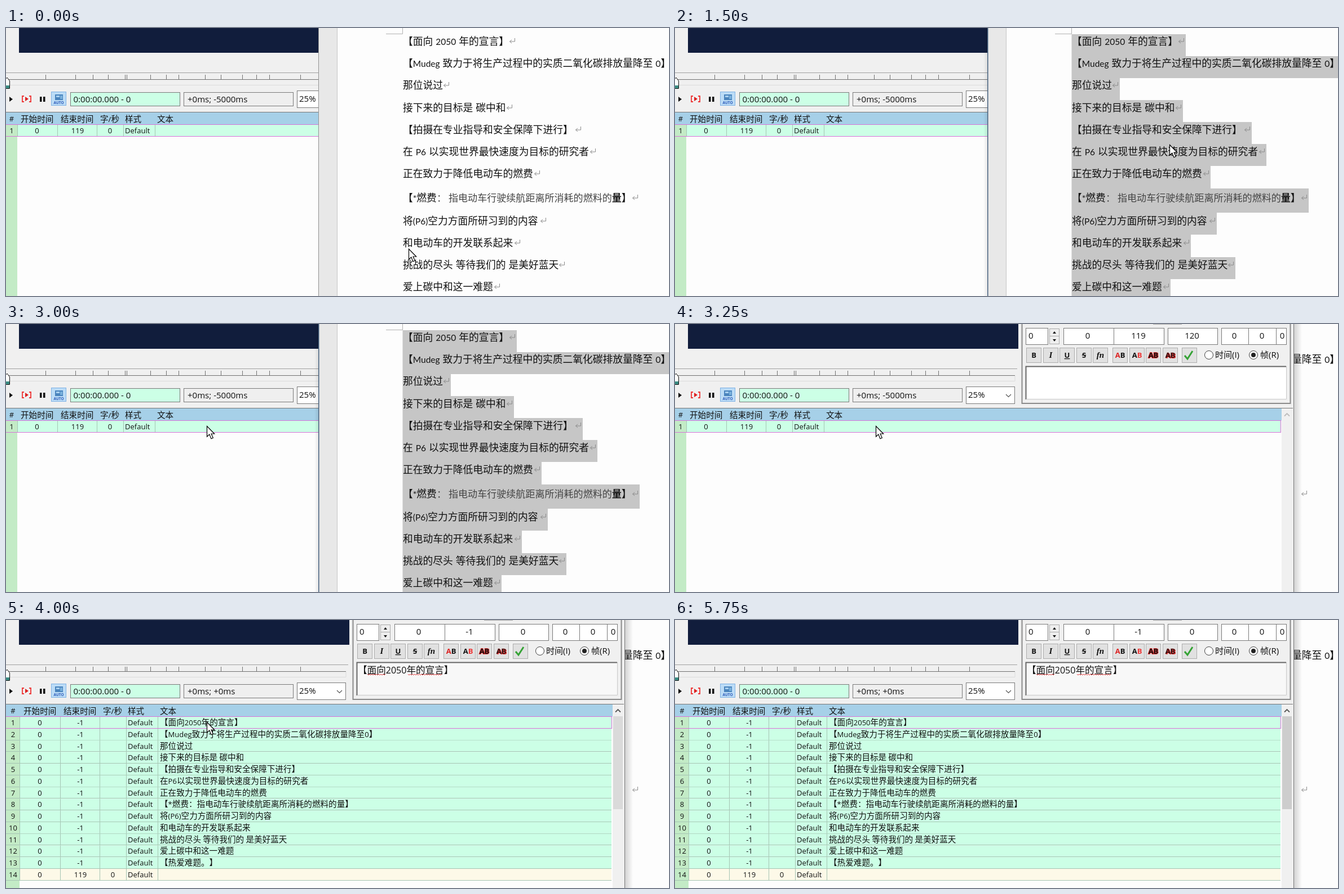
Recreate the animation shown at these times as an HTML page. Size 1176x476 px, loop 6000 ms.

```html
<!DOCTYPE html>
<html lang="zh-CN">
<head>
<meta charset="utf-8">
<title>粘贴字幕</title>
<style>
html, body { margin: 0; width: 100%; height: 100%; overflow: hidden; background: #fff; }
#stage { display: block; width: 1176px; height: 476px; }
text { font: 15px 'Open Sans', 'Noto Sans CJK SC', 'Noto Sans CJK', sans-serif; fill: #111; text-spacing-trim: space-all; }
.doc { font: 17.75px 'Noto Sans CJK SC', 'Noto Sans CJK', sans-serif; word-spacing: 1px; }
.doc tspan { font: 15.5px Lato, sans-serif; }
.doc .note { font: 17.06px 'Noto Sans CJK SC', 'Noto Sans CJK', sans-serif; fill: #444; }
.doc .strong { font: bold 17px 'Noto Sans CJK SC', 'Noto Sans CJK', sans-serif; }
.tab { font: 14.6px 'Noto Sans CJK SC', 'Noto Sans CJK', sans-serif; }
.tab tspan, .num { font: 13px 'Open Sans', sans-serif; }
.edit { font: 16.6px 'Noto Sans CJK SC', 'Noto Sans CJK', sans-serif; }
.edit tspan { font: 16px 'Open Sans', sans-serif; }
.mid { text-anchor: middle; }
.ab { font: bold 13px 'Open Sans', sans-serif; }
.serif { font: italic bold 15px 'Liberation Serif', serif; }
</style>
</head>
<body>
<svg id="stage" viewBox="0 0 1176 476"></svg>
<script>
const rect = (x, y, w, h, fill, stroke = 'none') =>
  `<rect x="${x}" y="${y}" width="${w}" height="${h}" fill="${fill}" stroke="${stroke}"/>`;
const path = (d, stroke, fill = 'none', width = 1) =>
  `<path d="${d}" stroke="${stroke}" fill="${fill}" stroke-width="${width}"/>`;
const text = (x, y, s, cls = '', more = '') => `<text x="${x}" y="${y}" class="${cls}" ${more}>${s}</text>`;
const mixed = s => s.replace(/[!-~]+/g, '<tspan>$&</tspan>');
const group = (id, s) => `<g id="${id}">${s}</g>`;

// text, vertical centre, top of the selection, x of the paragraph mark
const lines = [
  ['【面向 2050 年的宣言】', 23, 11, 892],
  ['【Mudeg 致力于将生产过程中的实质二氧化碳排放量降至 0】', 62, 50, 1180],
  ['那位说过', 101, 89, 775],
  ['接下来的目标是 碳中和', 141, 128, 887],
  ['【拍摄在专业指导和安全保障下进行】', 180, 167, 1009],
  ['在 P6 以实现世界最快速度为目标的研究者', 219, 206, 1035],
  ['正在致力于降低电动车的燃费', 258, 245, 936],
  ['【*燃费：指电动车行驶续航距离所消耗的燃料的量】', 301, 285, 1110],
  ['将(P6)空力方面所研习到的内容', 342, 328, 947],
  ['和电动车的开发联系起来', 381, 367, 901],
  ['挑战的尽头 等待我们的 是美好蓝天', 420, 407, 980],
  ['爱上碳中和这一难题', 459, 446, 865]
];

function docLine([s, y]) {
  const base = y + 6.5, [head, note] = s.split('：');
  if (!note) return text(704, base, mixed(s), 'doc');
  return text(704, base, mixed(head) + '<tspan class="note">：</tspan>', 'doc') +
    text(785, base, `<tspan class="note">${note.slice(0, -2)}</tspan>` +
      '<tspan class="strong">量</tspan>】', 'doc');
}

function wordWindow() {
  const bottom = i => i < 11 ? lines[i + 1][2] : 476;
  const marks = lines.map(l => path(`M${l[3] + 10.5} ${l[1] - 5}v6h-9m3.5-3l-3.5 3 3.5 3`, '#8a8a8a')).join('');
  return rect(555, 0, 621, 476, '#fdfdfd') + rect(555, 0, 32, 476, '#e8e8e8') +
    rect(587, 0, 1, 476, '#c6c6c6') +
    path('M674 10.5h29.5V0', '#b0b0b0') +
    group('selection', lines.map((l, i) =>
      rect(703.5, l[2], l[3] + 14 - 703.5, bottom(i) - l[2], '#c6c6c6')).join('')) +
    lines.map(docLine).join('') + marks +
    group('caret', rect(886, 131, 1, 21, '#000'));
}

function table(rows, dx) {
  const pitch = 20.77, top = 172;
  const cols = [91, 161.5, 208, 264].map(x => x + dx);
  let s = rect(0, 150, 1076, 21.5, '#a6d0e8') + rect(0, 171.5, 20 + dx * .8, 305, '#c3ebc6');
  s += text(10 + dx * .5, 166, '#', 'num mid');
  [[26, '开始时间'], [97, '结束时间'], [167, '字/秒'], [211, '样式'], [268, '文本']]
    .forEach(([x, name]) => s += text(x + dx, 167, mixed(name), 'tab'));
  rows.forEach((row, i) => {
    const y = top + i * pitch, base = y + 15, blank = row === '';
    s += rect(20 + dx * .8, y, 1054 - dx * .8, pitch, blank && i ? '#fdf9e8' : '#ccffe6');
    s += path(`M0 ${Math.round(y + pitch) - .5}H1074`, '#a5c4b3');
    cols.concat(20 + dx * .8).forEach(x => s += path(`M${Math.floor(x) + .5} ${y}v${pitch}`, '#a5c4b3'));
    s += text(10 + dx * .5, base, i + 1, 'num mid') + text(55 + dx, base, 0, 'num mid') +
      text(127 + dx, base, blank ? 119 : -1, 'num mid') + text(211 + dx, base, 'Default', 'num');
    s += blank ? text(184.5 + dx, base, 0, 'num mid') : text(268 + dx, base, mixed(row), 'tab');
  });
  return s + rect(-1, 171.5, 1075.5, 21, 'none', '#d873d8');
}

const field = (x, y, w, h, fill = '#fff') => rect(x + .5, y + .5, w - 1, h - 1, fill, '#7a7a7a');

function player() {
  const ticks = [70, 123, 154, 181, 211, 214, 256, 284, 306, 353, 381, 419, 444, 467, 522];
  return rect(23, 0, 586, 44, '#111d3c') +
    path('M0 79.5H607', '#a0a0a0') + path('M0 91.5H603' + ticks.map(x => `M${x + .5} 83v8`).join(''), '#707070') +
    path('M0 101.5H603V92', '#dcdcdc') +
    path('M-4 107.5V94l6-6 4.5 6v13.5z', '#111', '#fff') + rect(0, 102, 6, 5, '#3a8c84') +
    path('M6 122l6 4.5-6 4.5z', 'none', '#111') +
    path('M32 121h-3v10h3M41 121h3v10h-3', '#e33', 'none', 1.8) + path('M34 122l6 4-6 4z', 'none', '#d22') +
    rect(60, 122, 3.5, 9, '#111') + rect(66, 122, 3.5, 9, '#111') +
    rect(80.5, 113.5, 26, 24, '#bcdcf6', '#7fb2e5') + rect(87, 118, 14, 10, '#4a84bd') +
    rect(89, 120, 6, 3, '#a9d0ee') + rect(96, 120, 4, 6, '#79b0dc') +
    text(93.5, 135, 'AUTO', 'mid', 'style="font-size:6.5px;font-weight:bold;fill:#2858b8"') +
    field(114, 114, 195, 25, '#ccffe6') + text(119.5, 132, '0:00:00.000 - 0') +
    field(315, 114, 195, 25, '#efefef') + text(322, 132, '', '', 'id="shift"') +
    field(516, 111, 87, 31) + text(520, 131, '25%') + path('M587 125l4.5 4.5 4.5-4.5', '#555', 'none', 1.2);
}

function editor() {
  const key = x => rect(x + .5, 42.5, 26, 26, '#e1e1e1', '#adadad');
  const label = (x, s, cls, more) => text(x + 13.5, 60, s, cls + ' mid', more);
  const wave = (x, n) => path(`M${x} 96` + 'l2 2 2-2'.repeat(n), '#e04040');
  const radio = x => `<circle cx="${x}" cy="55" r="7.5" fill="#fff" stroke="#444"/>`;
  const glow = 'stroke="#e03030" stroke-width="2" paint-order="stroke"';
  const boxes = [[622, 40], [689, 90], [778, 90], [874, 89], [969, 49], [1017, 50], [1066, 19]];
  const values = [[732, 'start'], [822, 'end'], [917, 'span'], [992], [1041], [1077]];
  return path('M615.5 0V141H1091.5V0', '#8a8a8a', 'none', 2) + rect(848, 0, 51, 1, '#a8a8a8') +
    boxes.map(([x, w]) => field(x, 7, w, 30)).join('') + text(627, 26, 0) +
    values.map(([x, id]) => text(x, 26, 0, 'mid', id ? `id="${id}"` : '')).join('') +
    rect(664.5, 8.5, 17, 13, '#eee', '#aaa') + rect(664.5, 21.5, 17, 14, '#eee', '#aaa') +
    path('M670 17l3-4 3 4zM670 27l3 4 3-4z', 'none', '#111') +
    [623, 653, 682, 712, 741, 776, 806, 835, 865, 899].map(key).join('') +
    label(623, 'B', 'ab') + label(653, 'I', 'serif') +
    label(682, 'U', 'ab', 'text-decoration="underline"') + label(712, 'S', 'ab', 'text-decoration="line-through"') +
    label(741, 'fn', 'serif') +
    label(776, '<tspan fill="#d22">A</tspan>B', 'ab') + label(806, 'A<tspan fill="#e33">B</tspan>', 'ab') +
    label(835, 'AB', 'ab', glow) +
    text(880, 61, 'AB', 'ab mid', 'style="fill:#d22"') + label(865, 'AB', 'ab', 'stroke="#a22" stroke-width=".5"') +
    path('M904 56l5 6 9-14', '#36a336', 'none', 3) +
    radio(947) + text(958, 60, '时间(I)') + radio(1026) +
    '<circle cx="1026" cy="55" r="4" fill="#222"/>' + text(1038, 60, '帧(R)') +
    rect(622, 75, 463, 59, '#fff') + path('M622.5 134V75.5H1084', '#666', 'none', 2) +
    path('M1084.5 75V133.5H623', '#c8c8c8') +
    group('entry', rect(624, 77, 460, 56, '#f8f8f8') + text(624, 95, mixed('【面向2050年的宣言】'), 'edit') +
      wave(641, 8) + wave(713, 15));
}

function subtitleWindow() {
  return rect(0, 0, 1098, 476, '#f0f0f0') + player() + editor() +
    rect(0, 149, 1096, 1, '#777') + rect(0, 171, 1076, 305, '#fdfdfd') +
    group('empty', table([''], 0)) +
    group('filled', table([...lines.map(l => l[0].replace(/ ?([!-~]+) ?/g, '$1')), '【热爱难题。】', ''], 5)) +
    rect(1076, 150, 21, 326, '#f0f0f0') +
    '<rect id="thumb" x="1077" y="171" width="17" height="165"/>' +
    '<path id="up" d="M1081 163.5l4.5-4.5 4.5 4.5" fill="none" stroke-width="1.8"/>' +
    rect(1097, 0, 1, 476, '#777');
}

const stage = document.getElementById('stage');
stage.innerHTML = `<defs>
  <linearGradient id="shade"><stop stop-color="#000" stop-opacity=".17"/><stop offset="1" stop-color="#000" stop-opacity="0"/></linearGradient>
  <linearGradient id="shadeLeft"><stop stop-color="#000" stop-opacity="0"/><stop offset="1" stop-color="#000" stop-opacity=".1"/></linearGradient></defs>` +
  wordWindow() + group('shadow', rect(1098, 0, 14, 476, 'url(#shade)')) +
  `<svg id="app" height="476">${subtitleWindow()}</svg>` +
  group('edge', rect(547, 0, 8, 476, 'url(#shadeLeft)') + rect(554, 0, 1.5, 476, '#46617f')) +
  group('dimEdge', rect(554, 0, 1, 476, '#929292')) +
  group('cursor', path('M.5 .5V19l4.3-4 3.2 7.7 3.3-1.4-3.2-7.3h5.6z', '#000', '#fff', 1.2));

const el = id => document.getElementById(id);
const show = (id, on) => el(id).setAttribute('display', on ? 'inline' : 'none');
// time, x, y; no place means hidden
const stops = [[0, 714, 392], [250, 872, 212], [500, 884, 210], [750], [1500, 877, 207],
  [2500, 431, 210], [2750, 364, 194], [3000, 356, 181], [4500, 357, 182], [4750, 464, 401], [5000]];

function draw(t) {
  const front = t >= 3250, pasted = t >= 4000;
  const [, x, y] = stops.filter(s => s[0] <= t).pop();
  show('cursor', x !== undefined);
  if (x !== undefined) el('cursor').setAttribute('transform', `translate(${x} ${y})`);
  show('caret', t >= 750 && t < 1250);
  show('selection', t >= 1500 && !front);
  show('dimEdge', t < 750);
  show('edge', t >= 750 && !front);
  show('shadow', front);
  el('app').setAttribute('width', front ? 1098 : 555);
  show('empty', !pasted);
  show('filled', pasted);
  show('entry', pasted);
  show('thumb', pasted);
  el('thumb').setAttribute('fill', t < 4250 ? '#dadada' : '#cdcdcd');
  el('up').setAttribute('stroke', pasted ? '#555' : '#bbb');
  el('shift').textContent = pasted ? '+0ms; +0ms' : '+0ms; -5000ms';
  el('end').textContent = pasted ? '-1' : '119';
  el('span').textContent = pasted ? '0' : '120';
}

const began = performance.now();
function tick() {
  draw((performance.now() - began) % 6000);
  requestAnimationFrame(tick);
}
tick();
</script>
</body>
</html>
```
